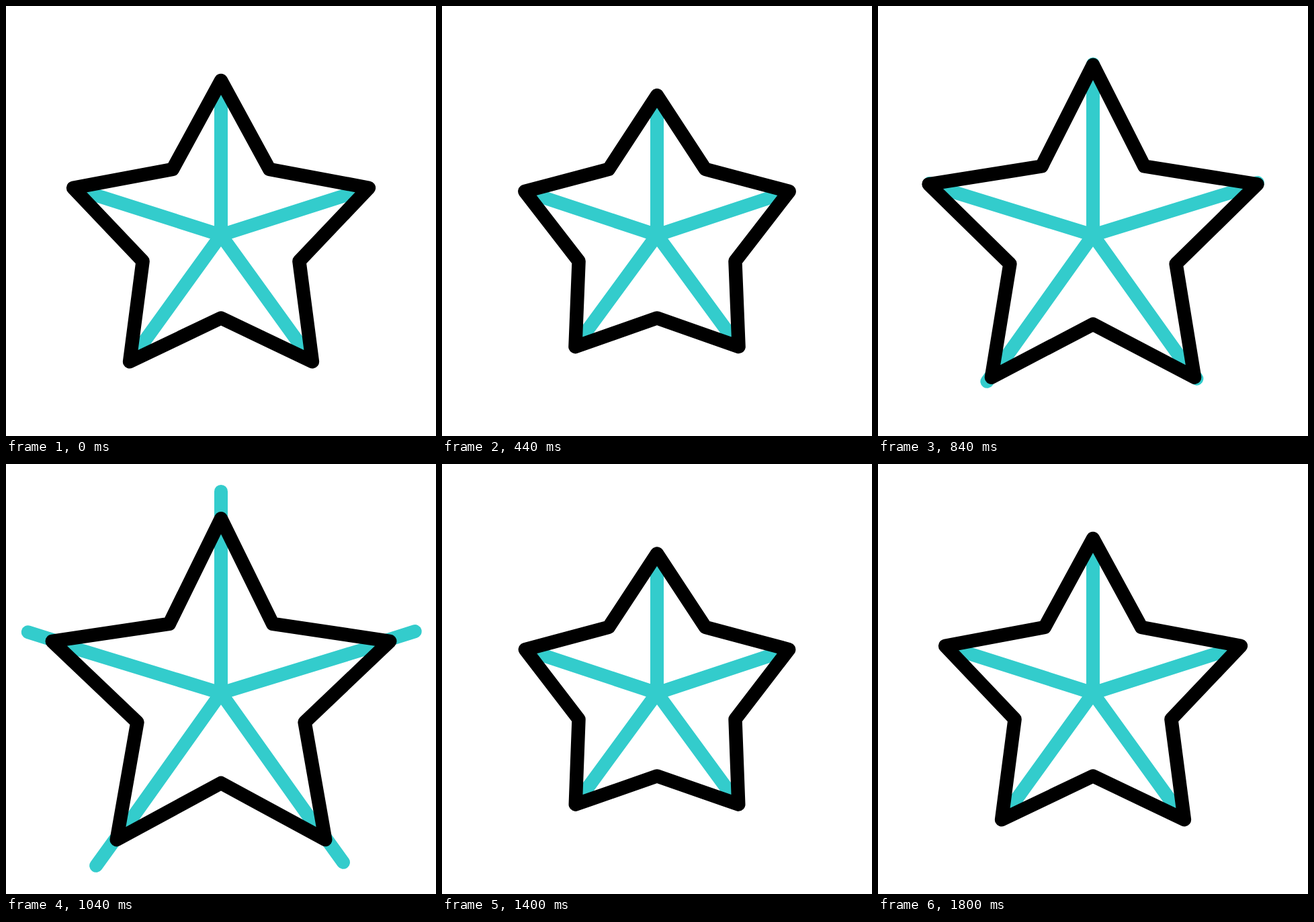
An HTML page for the animation above (2 s loop, 640 by 640 pixels).

```html
<!DOCTYPE html>
<html lang="en">
<head>
<meta charset="utf-8">
<title>Star</title>
<style>
  html, body { margin: 0; width: 100%; height: 100%; overflow: hidden; background: #fff; }
  svg { display: block; width: 100%; height: 100%; }
  path { fill: none; stroke-width: 20; stroke-linejoin: round; }
  #ribs, #rays { stroke: #33cccc; }
  #rays { stroke-linecap: round; }
  #star { stroke: #000; stroke-width: 20.4; }
</style>
</head>
<body>
<svg viewBox="0 0 640 640">
  <path id="ribs"/>
  <path id="rays"/>
  <path id="star"/>
</svg>
<script>
const LOOP = 2000, STEP = 40, CX = 320, CY = 341;

// [time, value] steps, eased in and out between neighbours
const OUTER = [[200, 231.3], [480, 205.8], [502, 205.8], [971, 267], [1430, 205.8], [1455, 205.8], [1800, 231.3]];
const INNER = [[502, 122.4], [971, 131.4], [1430, 122.4]];
const RAY_HEAD = [[680, 0.767], [1080, 1]];
const RAY_TAIL = [[880, 0.767], [1280, 1]];
// ray ends, relative to the centre
const RAYS = [[0, -301.5], [290, -92.3], [182.8, 253], [-186.7, 258], [-288.5, -91.2]];

// cubic-bezier(.42, 0, .58, 1)
function ease(x) {
  let lo = 0, hi = 1;
  for (let i = 0; i < 24; i++) {
    const u = (lo + hi) / 2, v = 1 - u;
    if (1.26 * u * v * v + 1.74 * u * u * v + u * u * u < x) lo = u; else hi = u;
  }
  return lo * lo * (3 - 2 * lo);
}

function track(steps, t) {
  if (t <= steps[0][0]) return steps[0][1];
  for (let i = 1; i < steps.length; i++) {
    const [t0, a] = steps[i - 1], [t1, b] = steps[i];
    if (t < t1) return a + (b - a) * ease((t - t0) / (t1 - t0));
  }
  return steps[steps.length - 1][1];
}

function polar(cy, radius, turn) {
  const a = turn * 2 * Math.PI;
  return [CX + radius * Math.sin(a), cy - radius * Math.cos(a)];
}

const fmt = p => p.map(n => n.toFixed(2)).join(' ');
const line = (a, b) => `M${fmt(a)}L${fmt(b)}`;
const setPath = (id, d) => document.getElementById(id).setAttribute('d', d);

function draw(t) {
  const outer = track(OUTER, t), inner = track(INNER, t);
  const outerY = 342.2 + 0.097 * (outer - 231.3);
  const innerY = 342 + 0.22 * (inner - 122.4);
  const points = [];
  let ribs = '';
  for (let i = 0; i < 5; i++) {
    points.push(polar(outerY, outer, i / 5), polar(innerY, inner, (i + 0.5) / 5));
    ribs += line([CX, CY], polar(outerY, outer - 12, i / 5));
  }
  setPath('star', 'M' + points.map(fmt).join('L') + 'Z');
  setPath('ribs', ribs);

  const head = track(RAY_HEAD, t), tail = track(RAY_TAIL, t);
  const at = ([x, y], k) => [CX + x * k, CY + y * k];
  setPath('rays', head - tail > 0.001 ? RAYS.map(r => line(at(r, tail), at(r, head))).join('') : '');
}

const start = performance.now();
function tick() {
  const t = (performance.now() - start) % LOOP;
  draw(Math.floor(t / STEP) * STEP);
  requestAnimationFrame(tick);
}
tick();
</script>
</body>
</html>
```
